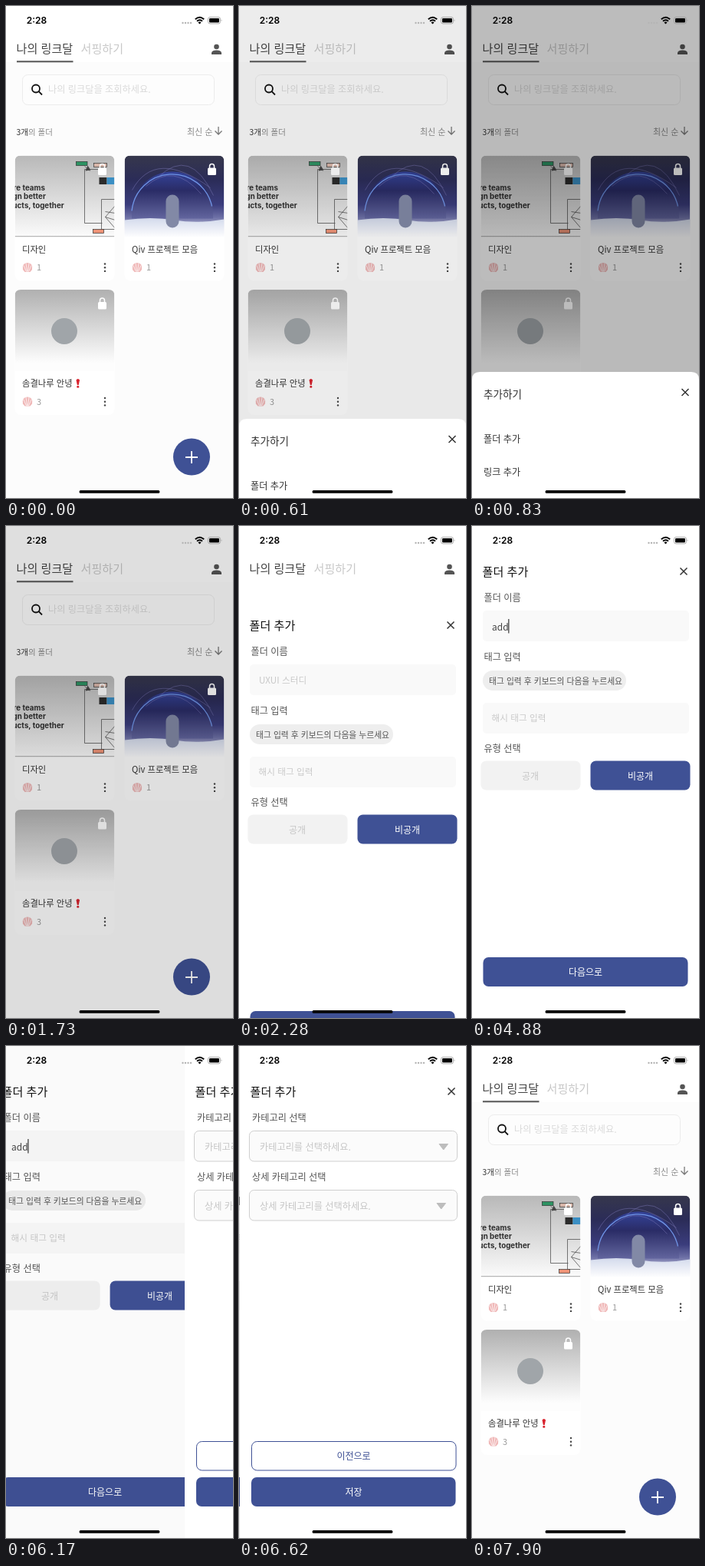
These frames come from a looping animation (296x640 px, 8 s). An HTML page:

```html
<!DOCTYPE html>
<html lang="ko">
<head>
<meta charset="utf-8">
<title>폴더 추가</title>
<style>
  html, body { margin: 0; width: 100%; height: 100%; overflow: hidden; background: #fff; }
  svg { display: block; width: 296px; height: 640px; }
  text { font: 400 12.2px "Noto Sans CJK KR", "Noto Sans CJK", "Noto Sans", sans-serif; fill: #555; }
  .tab { font-size: 15.1px; }
  .title { font-size: 15.1px; font-weight: 500; fill: #111; }
  .name { font-size: 11.3px; fill: #333; }
  .count { font-size: 11px; fill: #9a9a9a; }
  .hint { font-size: 11.7px; fill: #c9c9c9; }
  .pick { fill: #c6c6c6; }
  .btn { font-size: 12px; text-anchor: middle; }
  .slogan { font: 700 9.8px Inter, sans-serif; fill: #2e2e2e; }
  .clock { font: 600 12px Inter, sans-serif; fill: #000; }
  .white { fill: #fff; }
  .blue { fill: #3f5195; }
  .field { fill: #f9f9f9; }
  .line { fill: none; stroke: #555; stroke-width: .8; }
</style>
</head>
<body>
<svg viewBox="0 0 296 640">
  <defs>
    <linearGradient id="gray" x2="0" y2="1">
      <stop offset="0" stop-color="#b8b8b8"/><stop offset="1" stop-color="#fbfbfb"/>
    </linearGradient>
    <linearGradient id="fade" x2="0" y2="1">
      <stop offset="0" stop-color="#b0b0b0"/><stop offset=".9" stop-color="#fdfdfd"/>
    </linearGradient>
    <linearGradient id="space" x2="0" y2="1">
      <stop offset="0" stop-color="#36374c"/><stop offset=".3" stop-color="#2b2c58"/>
      <stop offset=".6" stop-color="#3a3c7c"/><stop offset=".76" stop-color="#6d70a6"/>
      <stop offset="1" stop-color="#fafafc"/>
    </linearGradient>
    <linearGradient id="globe" x2="0" y2="1">
      <stop offset="0" stop-color="#34439a"/><stop offset=".4" stop-color="#2a2c66"/>
      <stop offset="1" stop-color="#62659e"/>
    </linearGradient>
    <linearGradient id="snow" x2="0" y2="1">
      <stop offset="0" stop-color="#d3daec"/><stop offset="1" stop-color="#fdfdfe"/>
    </linearGradient>
    <clipPath id="thumb"><path d="M0 106V8Q0 0 8 0H122Q130 0 130 8V106Z"/></clipPath>
    <g id="lock">
      <rect x="108.500" y="16" width="11" height="9.500" rx="1.500" fill="#fff"/>
      <path d="M111 17V14a3 3 0 0 1 6 0V17" fill="none" stroke="#fff" stroke-width="1.500"/>
    </g>
    <g id="foot">
      <path d="M13 151.500L10.500 148.500Q9 140 16.500 139.500Q24 140 22.500 148.500L20 151.500Z" fill="#f0b9b9"/>
      <path d="M15 151L11.500 143M16 151L14.500 140M17 151L18.500 140M18 151L21.500 143" stroke="#fff" stroke-width=".7"/>
      <g fill="#444"><circle cx="117.500" cy="141" r="1.200"/><circle cx="117.500" cy="145.700" r="1.200"/><circle cx="117.500" cy="150.400" r="1.200"/></g>
    </g>
    <rect id="card" width="130" height="163" rx="8" fill="#fff"/>
    <path id="close" d="M-4.500 -4.500L4.500 4.500M4.500 -4.500L-4.500 4.500" stroke="#333" stroke-width="1.500"/>
  </defs>

  <g id="home">
    <rect width="296" height="640" fill="#fff"/>
    <rect y="73" width="296" height="567" fill="#fcfcfc"/>
    <text class="tab" x="13.500" y="61" style="fill:#444">나의 링크달</text>
    <text class="tab" x="97.500" y="61" style="fill:#c8c8c8">서핑하기</text>
    <rect x="14" y="71.300" width="73.500" height="2" fill="#555"/>
    <g fill="#555"><circle cx="274.500" cy="53" r="3.300"/><path d="M268 63V60.500Q269 57.500 274.500 57.500T281 60.500V63Z"/></g>

    <rect x="21.500" y="89.500" width="250" height="39" rx="7" fill="#fdfdfd" stroke="#ececec"/>
    <g fill="none" stroke="#111" stroke-width="1.800"><circle cx="39" cy="107.500" r="5"/><path d="M42.700 111.200L47 115.500"/></g>
    <text x="55" y="113" style="fill:#dadada">나의 링크달을 조회하세요.</text>

    <text x="13.500" y="168" style="font-size:10.500px;fill:#8a8a8a"><tspan style="fill:#333;font-weight:500">3개</tspan>의 폴더</text>
    <text x="236" y="167.500" style="font-size:11px;fill:#8a8a8a">최신 순</text>
    <path d="M277 157V167M272.500 162.500L277 167L281.500 162.500" fill="none" stroke="#777" stroke-width="1.300"/>

    <g transform="translate(11.500 194.500)">
      <use href="#card"/>
      <g clip-path="url(#thumb)">
        <rect width="130" height="106" fill="url(#gray)"/>
        <text class="slogan" x="-2" y="45">re teams</text>
        <text class="slogan" x="-3" y="56.500">gn better</text>
        <text class="slogan" x="-3" y="68">ucts, together</text>
        <path class="line" d="M91 88V18H112M91 88H114M113 96V57H131M113 96H131M91 14L98 20M118 80L131 65M118 80L131 84M118 80L131 95M118 73L131 75"/>
        <path d="M92 20L95 13L99 19Z" fill="#444"/>
        <rect x="80" y="8" width="14.500" height="5" fill="#2d9363" stroke="#333" stroke-width=".7"/>
        <rect x="103" y="10" width="17" height="5" fill="#d8b6a9" stroke="#333" stroke-width=".7"/>
        <rect x="110" y="28.500" width="10" height="9" fill="#2b2b2b"/>
        <rect x="120" y="28.500" width="10" height="9" fill="#3b8fc4"/>
        <rect x="102" y="96" width="14" height="5" fill="#ef9377" stroke="#333" stroke-width=".7"/>
        <rect y="105" width="130" height="1" fill="#777"/>
      </g>
      <use href="#lock"/><use href="#foot"/>
      <text class="name" x="9.500" y="126">디자인</text>
      <text class="count" x="28.500" y="149.500">1</text>
    </g>

    <g transform="translate(154.500 194.500)">
      <use href="#card"/>
      <g clip-path="url(#thumb)">
        <rect width="130" height="106" fill="url(#space)"/>
        <path d="M9.500 82V74A53 53 0 0 1 115.500 74V82Z" fill="url(#globe)"/>
        <path d="M9.500 72A53 53 0 0 1 114 66" fill="none" stroke="#6f94e6" stroke-width="1.300"/>
        <path d="M10 45Q40 -10 112 42M28 40Q64 8 100 50M44 28Q86 -12 116 52" fill="none" stroke="#7a76b4" stroke-width=".5"/>
        <path d="M0 84Q35 79 65 84T130 83V106H0Z" fill="url(#snow)"/>
        <rect x="54" y="51" width="17" height="43" rx="8.500" fill="#8289a6"/>
      </g>
      <use href="#lock"/><use href="#foot"/>
      <text class="name" x="9.500" y="126">Qiv 프로젝트 모음</text>
      <text class="count" x="28.500" y="149.500">1</text>
    </g>

    <g transform="translate(11.500 369)">
      <use href="#card"/>
      <g clip-path="url(#thumb)">
        <rect width="130" height="106" fill="url(#fade)"/>
        <circle cx="64.500" cy="54" r="17" fill="#a0a5a9"/>
      </g>
      <use href="#lock"/><use href="#foot"/>
      <text class="name" x="9.500" y="126">솜결나루 안녕</text>
      <path d="M80 117.500Q82.300 114.500 84.600 117.500L83.200 124H81.400Z" fill="#d9232e"/>
      <circle cx="82.300" cy="126.200" r="1.500" fill="#d9232e"/>
      <text class="count" x="28.500" y="149.500">3</text>
    </g>

    <circle class="blue" cx="242" cy="586.500" r="24"/>
    <path d="M234 587H250M242 579V595" stroke="#fff" stroke-width="1.800"/>
  </g>

  <rect id="dim" width="296" height="640"/>

  <g id="sheet">
    <path d="M0 180V10Q0 0 10 0H286Q296 0 296 10V180Z" fill="#fff"/>
    <text x="15" y="33.500" style="font-size:13.600px;fill:#333">추가하기</text>
    <use href="#close" x="278" y="26.500"/>
    <text x="15" y="91.500" style="fill:#333">폴더 추가</text>
    <text x="15" y="135" style="fill:#333">링크 추가</text>
  </g>

  <g id="modal">
    <g id="form">
      <rect width="296" height="640" fill="#fff"/>
      <text class="title" x="13.500" y="65">폴더 추가</text>
      <use href="#close" x="276" y="59"/>
      <text x="15.500" y="97.500">폴더 이름</text>
      <rect class="field" x="14" y="110" width="269" height="40" rx="5"/>
      <text class="hint" id="hint" x="26" y="134.500">UXUI 스터디</text>
      <text id="typed" x="26" y="135.500" style="font-size:12px;fill:#444"></text>
      <rect id="caret" y="121" width="1.600" height="18.500" fill="#666"/>
      <text x="15.500" y="174.500">태그 입력</text>
      <rect x="14" y="188" width="187" height="26" rx="13" fill="#eee"/>
      <text x="22" y="205.500" style="font-size:10.800px">태그 입력 후 키보드의 다음을 누르세요</text>
      <rect class="field" x="14" y="230" width="269" height="40" rx="5"/>
      <text class="hint" x="25.500" y="254">해시 태그 입력</text>
      <text x="15.500" y="293.500">유형 선택</text>
      <rect x="11.500" y="305.500" width="130" height="38" rx="7" fill="#f2f2f2"/>
      <text class="btn" x="76" y="329.500" style="fill:#c6c6c6">공개</text>
      <rect class="blue" x="154.500" y="305.500" width="130" height="38" rx="7"/>
      <text class="btn white" x="219.500" y="329.500">비공개</text>
      <rect class="blue" x="14.500" y="561" width="267" height="38" rx="7"/>
      <text class="btn white" x="148" y="585">다음으로</text>
      <rect id="shade" width="296" height="640"/>
    </g>
    <g id="detail">
      <rect width="296" height="640" fill="#fff"/>
      <text class="title" x="13.500" y="65">폴더 추가</text>
      <use href="#close" x="276" y="59"/>
      <g fill="#fbfbfb" stroke="#cfcfcf">
        <rect x="12.500" y="110.500" width="271" height="39.500" rx="6"/>
        <rect x="12.500" y="187.500" width="271" height="39.500" rx="6"/>
      </g>
      <text x="16" y="97.500">카테고리 선택</text>
      <text class="pick" x="26" y="135.500">카테고리를 선택하세요.</text>
      <text x="16" y="174.500">상세 카테고리 선택</text>
      <text class="pick" x="26" y="212.500">상세 카테고리를 선택하세요.</text>
      <path d="M260 127.500H271.500L265.700 135ZM257 204.500H268.500L262.700 212Z" fill="#bdbdbd" stroke="#bdbdbd" stroke-linejoin="round"/>
      <rect x="15.500" y="514.500" width="266.500" height="37.500" rx="7" fill="#fff" stroke="#3f5195"/>
      <text class="btn blue" x="148.500" y="538">이전으로</text>
      <rect class="blue" x="15" y="561" width="266.500" height="38" rx="7"/>
      <text class="btn white" x="148.500" y="585">저장</text>
    </g>
  </g>

  <g id="status">
    <text class="clock" x="26.800" y="23.300">2:28</text>
    <g fill="#b5b5b5"><circle cx="230.500" cy="22" r="1.200"/><circle cx="234" cy="22" r="1.200"/><circle cx="237.500" cy="22" r="1.200"/><circle cx="241" cy="22" r="1.200"/></g>
    <g fill="none" stroke="#000" stroke-width="1.900"><path d="M246.800 17.300Q252.500 12.300 258.200 17.300M249 19.800Q252.500 16.800 256 19.800"/></g>
    <path d="M250.500 21.400Q252.500 19.800 254.500 21.400L252.500 23.500Z"/>
    <rect x="263.500" y="14.500" width="16" height="8.500" rx="2.500" fill="none" stroke="#999" stroke-width=".8"/>
    <rect x="265" y="16" width="13" height="5.500" rx="1.300"/>
    <path d="M280.700 17.200Q282.300 18.700 280.700 20.200Z" fill="#999"/>
    <rect x="95.500" y="630" width="105" height="3.800" rx="1.900"/>
  </g>
</svg>
<script>
const LOOP = 8000, TICK = 110, W = 296, H = 640, SHEET_Y = 472;
const el = id => document.getElementById(id);
const [dim, sheet, modal, form, detail, shade, hint, typed, caret] =
  ['dim', 'sheet', 'modal', 'form', 'detail', 'shade', 'hint', 'typed', 'caret'].map(el);

const move = (node, x, y) => node.setAttribute('transform', `translate(${x} ${y})`);
const show = (node, on) => node.setAttribute('visibility', on ? 'inherit' : 'hidden');

// remaining distance (1 to 0) of a critically damped spring
const spring = (t, start) => {
  const x = Math.max(0, t - start) * 0.016;
  return (1 + x) * Math.exp(-x);
};
const smooth = (t, a, b) => {
  const f = Math.min(1, Math.max(0, (t - a) / (b - a)));
  return f * f * (3 - 2 * f);
};

// the screen refreshes in ticks within each transition
const starts = [0, 500, 1510, 6170, 7470];
const snap = t => {
  const s = starts.filter(v => v <= t).pop();
  return s + Math.floor((t - s) / TICK) * TICK;
};

function caretAlpha(t) {
  if (t < 3420 || (t >= 4050 && t < 4290) || (t >= 5510 && t < 5920)) return 0;
  return t >= 4290 && t < 4410 ? 0.5 : 1;
}

function draw(t) {
  const k = snap(t);

  // bottom sheet over the dimmed home
  dim.setAttribute('opacity', 0.28 * (smooth(k, 460, 900) - smooth(k, 1450, 1970)));
  const open = t >= 500 && t < 1730;
  const drop = t < 1510 ? spring(k, 480) : smooth(k, 1450, 1720);
  show(sheet, open);
  move(sheet, 0, SHEET_Y + Math.round(drop * (H - SHEET_Y)));

  // full-screen page: rises, later drops
  let y = 0;
  if (t < 2830) y = H * spring(Math.min(k, 2500), 2044);
  else if (t >= 7470) y = H * (1 - spring(k, 7430));
  show(modal, t >= 2060 && t < 7900);
  move(modal, 0, Math.round(y));

  // name typing
  const word = t < 4680 ? '' : t < 4880 ? 'a' : 'add';
  if (typed.textContent !== word) typed.textContent = word;
  show(hint, !word);
  caret.setAttribute('x', 26 + [0, 6.5, 0, 21][word.length]);
  caret.setAttribute('opacity', caretAlpha(t));

  // push to the second step, with parallax
  const pushed = t >= 6170;
  const x = pushed ? Math.round(W * spring(Math.min(k, 6610), 6116)) : W;
  show(detail, pushed);
  move(detail, x, 0);
  move(form, -0.3 * (W - x), 0);
  shade.setAttribute('opacity', 0.1 * (1 - x / W));
}

const t0 = performance.now();
function frame() {
  draw((performance.now() - t0) % LOOP);
  requestAnimationFrame(frame);
}
frame();
</script>
</body>
</html>
```
